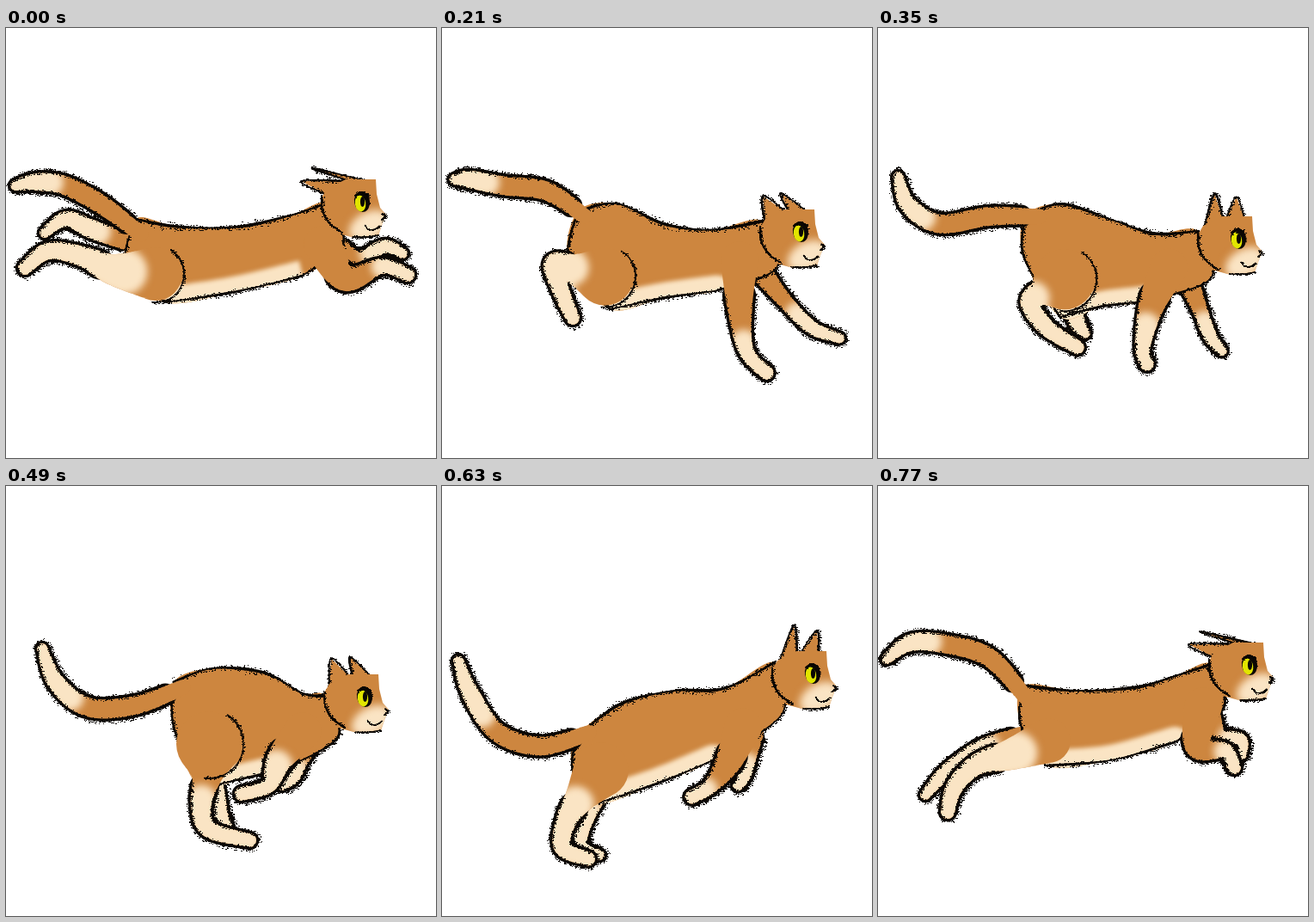
An HTML page with a canvas for the animation above (840 ms loop, 500x500 px).

```html
<!DOCTYPE html>
<html lang="en">
<head>
<meta charset="utf-8">
<title>Running cat</title>
<style>
html, body { margin: 0; width: 100%; height: 100%; overflow: hidden; background: #fff; }
canvas { display: block; width: 500px; height: 500px; }
</style>
</head>
<body>
<canvas id="stage" width="500" height="500"></canvas>
<script>
const ctx = document.getElementById('stage').getContext('2d');
const FUR = '#cd863f', CREAM = '#fae4c4', INK = '#0b0704';
const STEP = 70, STEPS = 12, PUSH_OFF = 8;

// Key poses; the steps between them are interpolated.
// Limbs and tail run from base to tip. Body: back (5 points), chest, belly (3), rump.
// Head: eye position, ears from folded (0) to upright (1).
// Coat: thigh radius, where the cream starts on the near hind and fore leg.
const POSES = [
  { at: 0, head: [413,203, 0], coat: [33, .2, .7],
    tail: [157,240, 112,206, 68,183, 35,179, 11,183],
    body: [150,222, 200,231, 270,231, 330,218, 375,203, 392,250, 345,288, 265,307, 185,319, 140,275],
    farHind: [145,250, 100,234, 70,222, 45,238],
    nearHind: [174,286, 125,281, 90,266, 50,259, 22,279],
    farFore: [385,255, 410,268, 440,254, 461,262],
    nearFore: [368,252, 395,291, 437,277, 467,287] },
  { at: 140, head: [413,230, .1], coat: [35, .25, .66],
    tail: [154,226, 125,179, 85,154, 40,157, 15,187],
    body: [155,214, 205,207, 260,230, 320,231, 372,217, 390,268, 332,299, 260,313, 185,326, 138,285],
    farHind: [152,255, 135,240, 120,226, 112,219],
    nearHind: [172,290, 138,272, 107,256, 102,290, 98,323],
    farFore: [375,270, 405,302, 447,328, 485,332],
    nearFore: [357,265, 374,318, 398,368, 423,395] },
  { at: 280, head: [419,246, 1], coat: [36, .4, .57],
    tail: [178,212, 120,201, 60,213, 24,195, 14,165],
    body: [160,214, 200,201, 258,226, 310,238, 374,232, 388,290, 306,312, 255,315, 205,328, 157,260],
    farHind: [200,290, 215,310, 225,326, 232,334],
    nearHind: [207,288, 176,290, 153,294, 175,322, 206,351],
    farFore: [362,290, 390,330, 412,368, 439,389],
    nearFore: [335,275, 318,325, 309,382, 332,407] },
  { at: 490, head: [416,246, .65], coat: [40, .48, .42],
    tail: [206,234, 150,255, 95,257, 58,228, 42,189],
    body: [195,228, 240,212, 300,217, 345,241, 370,244, 386,292, 320,330, 268,342, 225,352, 195,280],
    farHind: [235,310, 243,355, 250,385, 258,397],
    nearHind: [236,300, 234,335, 227,370, 236,399, 283,412],
    farFore: [355,295, 342,320, 334,338, 321,348],
    nearFore: [345,285, 318,318, 305,348, 274,358] },
  { at: 560, head: [430,219, 1], coat: [32, .48, .5],
    tail: [165,298, 115,310, 68,295, 35,245, 12,211],
    body: [150,296, 210,252, 270,230, 325,233, 388,205, 395,265, 320,322, 265,337, 200,360, 158,325],
    farHind: [215,340, 215,375, 228,405, 251,416],
    nearHind: [190,325, 181,355, 177,380, 191,411, 222,424],
    farFore: [352,300, 350,335, 340,372, 324,392],
    nearFore: [345,285, 325,338, 302,368, 274,381] },
  { at: 700, head: [430,218, 1], coat: [36, .18, 1],
    tail: [177,276, 115,295, 60,277, 30,235, 26,195],
    body: [165,285, 205,255, 270,246, 330,238, 386,205, 396,265, 310,316, 235,355, 150,381, 145,335],
    farHind: [175,340, 120,390, 92,430, 115,442],
    nearHind: [180,335, 142,368, 112,398, 90,430, 118,443],
    farFore: [370,275, 365,290, 363,300, 364,305],
    nearFore: [355,275, 340,305, 322,330, 307,342] },
  { at: 770, head: [431,209, 0], coat: [28, .22, .7],
    tail: [172,246, 130,200, 80,184, 38,182, 10,201],
    body: [170,232, 230,238, 300,234, 345,221, 388,207, 402,258, 345,298, 270,319, 195,325, 165,275],
    farHind: [165,290, 120,306, 80,332, 55,359],
    nearHind: [198,296, 155,312, 115,324, 89,350, 81,379],
    farFore: [385,265, 397,290, 421,295, 423,312],
    nearFore: [378,256, 372,302, 404,308, 414,327] }
];

const HEAD = [-40,-16, -18,-27, 17,-27, 18,-10, 22,6, 29,14, 24,26, 20,38, -8,41, -30,35, -45,16, -47,-4];

let seed = 1;
function rnd() {
  seed = (seed * 1664525 + 1013904223) >>> 0;
  return seed / 4294967296;
}
const jitter = w => (rnd() + rnd() - 1) * w;
const mix = (a, b, k) => a.map((v, i) => v + (b[i] - v) * k);

function poseAt(time) {
  const i = POSES.findLastIndex(p => p.at <= time);
  const a = POSES[i], b = POSES[i + 1];
  if (a.at === time || !b) return a;
  const k = (time - a.at) / (b.at - a.at), out = {};
  for (const key in a) {
    if (key !== 'at') out[key] = mix(a[key], b[key], k);
  }
  return out;
}

function points(flat) {
  const out = [];
  for (let i = 0; i < flat.length; i += 2) out.push([flat[i], flat[i + 1]]);
  return out;
}

// Catmull-Rom curve through points of any dimension
function curve(pts, closed = false, sub = 16) {
  const n = pts.length, out = [];
  const get = i => closed ? pts[(i + n) % n] : pts[Math.max(0, Math.min(n - 1, i))];
  for (let i = 0; i < (closed ? n : n - 1); i++) {
    const a = get(i - 1), b = get(i), c = get(i + 1), d = get(i + 2);
    for (let s = 0; s < sub; s++) {
      const t = s / sub;
      out.push(b.map((v, j) => {
        const slope = c[j] - a[j];
        const bend = 2 * a[j] - 5 * v + 4 * c[j] - d[j];
        const twist = 3 * (v - c[j]) + d[j] - a[j];
        return v + t * (slope + t * (bend + t * twist)) / 2;
      }));
    }
  }
  out.push(get(closed ? 0 : n - 1));
  return out;
}

function trace(pts) {
  ctx.beginPath();
  pts.forEach(p => ctx.lineTo(p[0], p[1]));
}

function discs(list, grow) {
  ctx.beginPath();
  for (const [x, y, r] of list) {
    const q = Math.max(1, r + grow);
    ctx.moveTo(x + q, y);
    ctx.arc(x, y, q, 0, 7);
  }
}

function oval(color, x, y, rx, ry, tilt = 0) {
  ctx.fillStyle = color;
  ctx.beginPath();
  ctx.ellipse(x, y, rx, ry, tilt, 0, 7);
  ctx.fill();
}

// Blurred paint inside the current path
function softInside(blur, paint) {
  ctx.save();
  ctx.clip();
  ctx.filter = `blur(${blur}px)`;
  ctx.fillStyle = ctx.strokeStyle = CREAM;
  paint();
  ctx.restore();
}

const speck = (x, y) => ctx.fillRect(Math.round(x), Math.round(y), rnd() < .3 ? 2 : 1, 1);

// Charcoal line: a thin core with loose grain around it
function ink(pts, w) {
  const phase = rnd() * 6;
  let run = 0;
  ctx.strokeStyle = ctx.fillStyle = INK;
  ctx.lineCap = 'round';
  for (let i = 1; i < pts.length; i++) {
    const [x0, y0] = pts[i - 1], [x1, y1] = pts[i];
    const len = Math.hypot(x1 - x0, y1 - y0);
    run += len;
    const force = w * (.8 + .25 * Math.sin(run * .06 + phase));
    ctx.lineWidth = force * .6;
    trace([pts[i - 1], pts[i]]);
    ctx.stroke();
    for (let k = 0; k < len * 2; k++) {
      const t = rnd();
      speck(x0 + (x1 - x0) * t + jitter(force), y0 + (y1 - y0) * t + jitter(force));
    }
  }
}

function limb(flat, radii, inkFrom, creamFrom) {
  const all = curve(points(flat).map((p, i) => [...p, radii[i]]));
  const from = f => all.slice(Math.floor(f * (all.length - 1)));
  const drawn = from(inkFrom), tip = drawn.length - 1;

  ctx.fillStyle = INK;
  discs(drawn, 1.3);
  ctx.fill();
  ctx.fillStyle = FUR;
  discs(all, -2);
  ctx.fill();
  if (creamFrom < 1) {
    softInside(4, () => {
      discs(from(creamFrom), 4);
      ctx.fill();
    });
  }

  // Grain along the outer edge only
  ctx.fillStyle = INK;
  drawn.forEach(([x, y, r], i) => {
    const p = drawn[Math.max(0, i - 1)], q = drawn[Math.min(tip, i + 1)];
    const dir = Math.atan2(q[1] - p[1], q[0] - p[0]);
    const count = i === tip ? 70 : 18;
    for (let k = 0; k < count; k++) {
      const side = (k % 2 ? 1 : -1) * (Math.PI / 2 + jitter(.25));
      const turn = dir + (i === tip ? (rnd() - .5) * Math.PI : side);
      const d = r + jitter(4.5);
      const sx = x + Math.cos(turn) * d, sy = y + Math.sin(turn) * d;
      if (all.every(c => Math.hypot(c[0] - sx, c[1] - sy) > c[2] - 3.5)) speck(sx, sy);
    }
  });
}

function torso(body) {
  const pts = points(body);
  const belly = curve(pts.slice(6, 9));
  ctx.fillStyle = FUR;
  trace(curve(pts, true));
  ctx.fill();
  softInside(2.5, () => {
    ctx.lineWidth = 36;
    trace(belly);
    ctx.stroke();
  });
  ink(curve(pts.slice(0, 5)), 5.5);
  ink(curve(pts.slice(4, 7)), 4.5);
  ink(belly, 4.5);
  ink(curve([...pts.slice(8), pts[0]]), 4);
}

function thighLine([x, y], r) {
  const arc = [];
  for (let a = -1; a < 1.7; a += .15) arc.push([x + r * Math.cos(a), y + r * Math.sin(a)]);
  ink(arc, 3);
}

function ear(tip, a, b) {
  ctx.fillStyle = FUR;
  trace([a, tip, b]);
  ctx.fill();
  ink(curve([a, tip, b], false, 10), 4);
}

function head([x, y, up]) {
  const mark = (flat, w) => ink(curve(points(flat)), w);
  ctx.save();
  ctx.translate(Math.round(x), Math.round(y));
  ear(mix([-57, -40], [6, -51], up), [-13, -25], [8, -25]);
  ear(mix([-70, -25], [-21, -57], up), [-40, -9], [-17, -25]);
  ctx.fillStyle = FUR;
  trace(points(HEAD));
  ctx.fill();
  softInside(5, () => oval(CREAM, 9, 27, 25, 16, -.5));

  mark([-46,-7, -45,9, -37,24, -22,35], 3.5);
  mark([-10,40, 6,40, 20,38], 2.5);
  mark([4,26, 8,31, 15,31, 21,27], 1.6);
  mark([25,13, 28,16, 24,20], 3);

  oval(INK, 1, -1, 9, 12, -.15);
  oval('#e2e500', -1, 1, 6.2, 9.5, -.15);
  oval(INK, 1.5, -1, 2.6, 6);
  mark([-7,-8, 0,-12, 7,-8, 8,2], 3);
  ctx.restore();
}

function draw(step) {
  const p = poseAt(step * STEP);
  const [thigh, hindCream, foreCream] = p.coat;
  seed = step * 977 + 31;
  ctx.fillStyle = '#fff';
  ctx.fillRect(0, 0, 500, 500);
  limb(p.farHind, [12, 13, 11, 8], .12, .3);
  limb(p.farFore, [15, 11, 10, 8], .12, .5);
  torso(p.body);
  limb(p.tail, [11, 13, 13, 12, 8], .12, .63);
  limb(p.nearHind, [thigh, 20, 14, 12, 10], .36, hindCream);
  if (step < PUSH_OFF) thighLine(p.nearHind, thigh);
  limb(p.nearFore, [24, 17, 11, 10], .28, foreCream);
  head(p.head);
}

let shown = -1;
const start = performance.now();
function tick() {
  const step = Math.floor((performance.now() - start) / STEP) % STEPS;
  if (step !== shown) draw(shown = step);
  requestAnimationFrame(tick);
}
tick();
</script>
</body>
</html>
```
